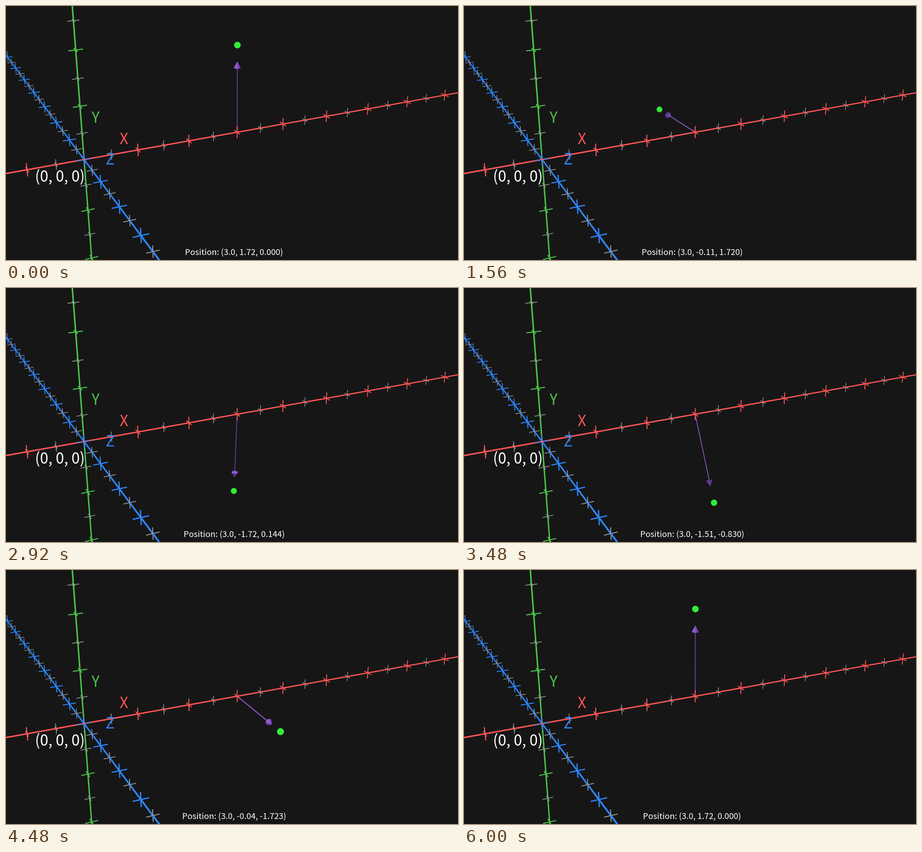
These frames come from a looping animation (998x561 px, 6.04 s). A matplotlib script:

```python
import numpy as np
import matplotlib.pyplot as plt
from matplotlib.animation import FuncAnimation
from matplotlib.collections import PolyCollection

W, H, DPI = 998, 561, 100
FRAMES, INTERVAL = 151, 40
PX = 72 / DPI

BG = "#161616"
RED, GREEN, BLUE, GREY = "#ff5555", "#4bc44b", "#2d87ff", "#a2a2a6"
PURPLE = np.array([160, 98, 236]) / 255

# Camera: yaw and pitch, pixels per unit at the origin, inverse depth
YAW, PITCH = np.radians(25.5), np.radians(22)
SCALE, INV_DEPTH = 125.2, 0.0718
OFFSET = np.array([-326.6, 58.7])
sy, cy, sp, cp = np.sin(YAW), np.cos(YAW), np.sin(PITCH), np.cos(PITCH)
RIGHT = np.array([cy, 0, -sy])
DOWN = np.array([-sp * sy, -cp, -sp * cy])
FORWARD = np.array([cp * sy, -sp, cp * cy])
CAMERA = (-OFFSET[0] * RIGHT - OFFSET[1] * DOWN) / SCALE - FORWARD / INV_DEPTH

LIGHT = np.array([-0.5, 0.85, -0.1])
LIGHT /= np.linalg.norm(LIGHT)

BASE = np.array([3.0, 0, 0])
ORBIT, TIP, NECK = 1.7234, 1.4, 1.29
CONE_R, DOT_R, SIDES = 0.06, 0.06, 40


def depth(p):
    return 1 + INV_DEPTH * (np.asarray(p) @ FORWARD)


def project(p):
    p = np.asarray(p, float)
    plane = np.stack([p @ RIGHT, p @ DOWN], axis=-1) * SCALE + OFFSET
    return plane / depth(p)[..., None] + [W / 2, H / 2]


def shade(normal):
    return PURPLE * (0.5 + 0.5 * max(0.0, normal @ LIGHT))


def unit(v):
    return v / np.linalg.norm(v)


fig = plt.figure(figsize=(W / DPI, H / DPI), dpi=DPI, facecolor=BG)
ax = fig.add_axes([0, 0, 1, 1])
ax.set_xlim(0, W)
ax.set_ylim(H, 0)
ax.axis("off")


def rod(a, b, width, color, z):
    """A tapered bar between two points in space."""
    ends = project([a, b])
    dx, dy = unit(ends[1] - ends[0])
    side = np.array([-dy, dx])
    half = width * SCALE / depth([a, b]) / 2
    quad = [ends[0] + side * half[0], ends[1] + side * half[1],
            ends[1] - side * half[1], ends[0] - side * half[0]]
    ax.add_patch(plt.Polygon(quad, fc=color, lw=0, zorder=z))


def tick(p, k, size, width, color, z):
    for j in range(3):
        if j == k:
            continue
        step = np.eye(3)[j] * size
        if step @ FORWARD > 0:
            step = -step
        rod(p, p + step, width, color, z + 0.2)
        rod(p, p - step, width, color, z - 0.2)


def draw_axis(k, lo, hi, color, z):
    e = np.eye(3)[k]
    rod(lo * e, hi * e, 0.025, color, z)
    for n in range(2 * lo, 2 * hi + 1):
        if n % 2:
            tick(n / 2 * e, k, 0.1, 0.012, GREY, z)
        else:
            tick(n / 2 * e, k, 0.125, 0.018, color, z)


draw_axis(1, -3, 4, GREEN, 2)
draw_axis(0, -3, 10, RED, 3)
draw_axis(2, -5, 10, BLUE, 4)
rod([-0.025, 0, 0], [0.025, 0, 0], 0.025, RED, 4.5)


def label(x, y, s, px, color):
    return ax.text(x, y, s, fontsize=px * PX, color=color, ha="center",
                   va="baseline", family="Noto Sans CJK JP", zorder=9)


label(260, 305, "X", 33, RED)
label(197, 257.5, "Y", 33, GREEN)
label(229, 349.5, "Z", 33, BLUE)
label(119, 388, "(0, 0, 0)", 33, "white")
readout = label(503.5, 550, "", 18.3, "white")

shaft, = ax.plot([], [], solid_capstyle="butt")
cone = PolyCollection([], linewidths=0.4)
ax.add_collection(cone)
dot = plt.Circle((0, 0), 1, fc="#2fee3a", lw=0)
ax.add_patch(dot)


def cone_faces(d):
    """Visible faces of the arrow head and their colours."""
    side = np.cross(d, [1.0, 0, 0])
    angles = np.linspace(0, 2 * np.pi, SIDES + 1)

    def radial(a):
        return np.cos(a) * np.array([1.0, 0, 0]) + np.sin(a) * side

    neck, tip = BASE + NECK * d, BASE + TIP * d
    ring = np.array([neck + CONE_R * radial(a) for a in angles])
    faces, colors = [], []
    base_seen = -d @ (CAMERA - neck) > 0
    if base_seen:
        faces.append(project(ring[:-1]))
        colors.append(shade(-d))
    for i in range(SIDES):
        mid = radial((angles[i] + angles[i + 1]) / 2)
        normal = unit(mid * (TIP - NECK) + d * CONE_R)
        if normal @ (CAMERA - tip) > 0:
            faces.append(project([ring[i], ring[i + 1], tip]))
            colors.append(shade(normal))
    return faces, colors, base_seen


def update(i):
    a = 2 * np.pi * i / (FRAMES - 1)
    d = np.array([0, np.cos(a), np.sin(a)])
    pos = BASE + ORBIT * d
    front = d[2] < -1e-6

    faces, colors, base_seen = cone_faces(d)
    cone.set_verts(faces)
    cone.set_facecolor(colors)
    cone.set_edgecolor(colors)
    cone.set_zorder(5 if front else 1.5)

    ends = np.array([BASE, BASE + NECK * d])
    shaft.set_data(*project(ends).T)
    facing = -FORWARD + (FORWARD @ d) * d
    shaft.set_color(shade(unit(facing)))
    shaft.set_linewidth(2 / depth(ends).mean() * PX)
    shaft.set_zorder(1.6 if base_seen else 1.4)

    dot.center = project(pos)
    dot.set_radius(DOT_R * SCALE / depth(pos))
    dot.set_zorder(6 if front else 1)

    # Adding zero removes a negative zero
    y, z = round(pos[1], 2) + 0.0, round(pos[2], 3) + 0.0
    readout.set_text(f"Position: ({pos[0]:.1f}, {y:.2f}, {z:.3f})")
    return shaft, cone, dot, readout


anim = FuncAnimation(fig, update, frames=FRAMES, interval=INTERVAL,
                     repeat=True, repeat_delay=0)
plt.show()
```
